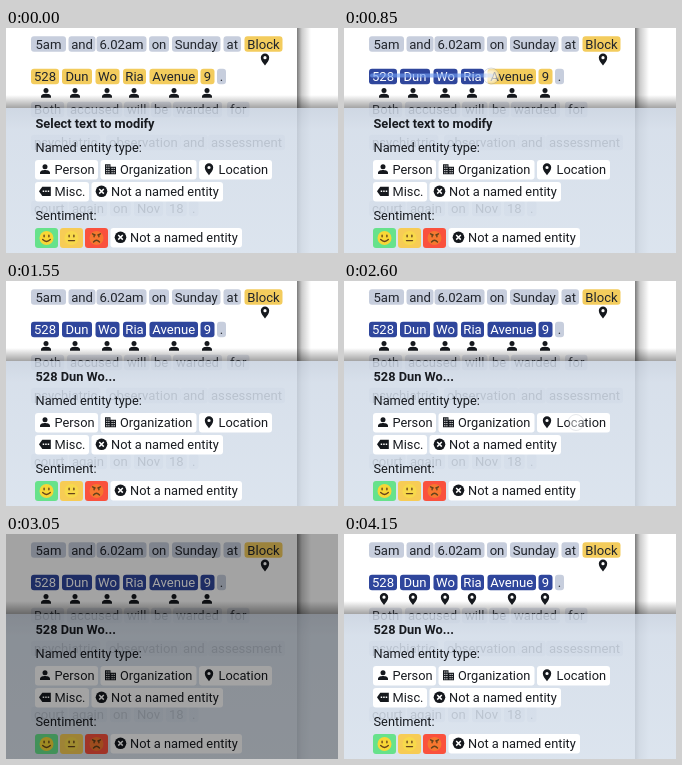
These frames come from a looping animation (332 px wide and 225 px high, 4.5 s). An HTML page:

```html
<!DOCTYPE html>
<html lang="en">
<head>
<meta charset="utf-8">
<title>Entity tagging</title>
<style>
  html, body { margin: 0; width: 100%; height: 100%; overflow: hidden; background: #fff; }
  svg { display: block; width: 332px; height: 225px; }
  text { font: 13.1px Roboto, sans-serif; fill: #20242b; }
  .panel text { font-size: 12.8px; fill: #181b20; }
  .panel .title { font-weight: 700; }
  .word rect { fill: #c7cedd; }
  .entity rect { fill: #f3cc5d; }
  .picked rect { fill: #2f469c; }
  .picked text { fill: #fff; }
  .behind rect { opacity: .5; }
  .behind text { fill: #41454d; }
</style>
</head>
<body>
<svg viewBox="0 0 332 225">
  <defs>
    <linearGradient id="edge">
      <stop offset="0" stop-color="#000" stop-opacity=".52"/>
      <stop offset=".35" stop-color="#000" stop-opacity=".2"/>
      <stop offset="1" stop-color="#000" stop-opacity="0"/>
    </linearGradient>
    <linearGradient id="lift" x2="0" y2="1">
      <stop offset="0" stop-color="#000" stop-opacity="0"/>
      <stop offset="1" stop-color="#000" stop-opacity=".36"/>
    </linearGradient>
    <linearGradient id="sheet" x2="0" y2="1">
      <stop offset="0" stop-color="#c6d0de"/>
      <stop offset=".15" stop-color="#d0dae7"/>
      <stop offset="1" stop-color="#d5dfeb"/>
    </linearGradient>
    <radialGradient id="glow">
      <stop offset=".55" stop-color="#fff" stop-opacity=".92"/>
      <stop offset="1" stop-color="#fff" stop-opacity=".35"/>
    </radialGradient>
    <g id="person">
      <circle cy="-2.6" r="2.5"/>
      <path d="M-5 4.8V3.5C-5 1.4-2 .7 0 .7S5 1.4 5 3.5V4.8Z"/>
    </g>
    <path id="pin" fill-rule="evenodd" d="M0 6C-2 3.4-4.2.8-4.2-1.8A4.2 4.2 0 0 1 4.2-1.8C4.2.8 2 3.4 0 6ZM0-3.4A1.6 1.6 0 1 0 0-.2A1.6 1.6 0 1 0 0-3.4Z"/>
    <g id="building">
      <path d="M-5.5-5H0V-2.6H5.5V5H-5.5Z"/>
      <path d="M-4.3-3.3H-1M-4.3-1H-1M-4.3 1.3H-1M-4.3 3.5H-1M1-.9H4.3M1 1.3H4.3M1 3.5H4.3" stroke="#fff" stroke-dasharray="1.2 .9"/>
    </g>
    <g id="label">
      <path d="M-6 0L-2.7-4.6H5.8V4.6H-2.7Z"/>
      <path d="M-2.3 0H4.4" stroke="#fff" stroke-width="1.5" stroke-dasharray="1.5 1"/>
    </g>
    <g id="cancel">
      <circle r="5.8"/>
      <path d="M-2.3-2.3L2.3 2.3M2.3-2.3L-2.3 2.3" stroke="#fff" stroke-width="1.5"/>
    </g>
  </defs>

  <rect width="332" height="225" fill="#fff"/>
  <rect x="291" width="14" height="225" fill="url(#edge)"/>
  <g id="page"></g>
  <path id="trail" fill="none" stroke="#6f9cf0" stroke-width="4" stroke-linecap="round"/>
  <rect y="67" width="332" height="13" fill="url(#lift)"/>
  <rect y="80" width="332" height="145" fill="url(#sheet)" opacity=".84"/>
  <g class="panel" id="panel">
    <text class="title" id="title" x="29.5" y="100"></text>
    <text x="29.5" y="124">Named entity type:</text>
    <text x="29.5" y="192">Sentiment:</text>
  </g>
  <rect id="dim" width="332" height="225"/>
  <circle id="touch" r="8" fill="url(#glow)" stroke="#8b93a3" stroke-opacity=".55" stroke-width=".8"/>
</svg>
<script>
const LOOP = 4500, STEP = 50;
const $ = id => document.getElementById(id);

function add(parent, tag, attrs, content) {
  const node = document.createElementNS('http://www.w3.org/2000/svg', tag);
  for (const key in attrs) node.setAttribute(key, attrs[key]);
  if (content) node.textContent = content;
  return parent.appendChild(node);
}

function icon(parent, name, x, y) {
  return add(parent, 'use', { href: '#' + name, x, y, fill: '#15181d' });
}

function word(label, left, right, baseline, kind = '') {
  const group = add($('page'), 'g', { class: 'word ' + kind });
  add(group, 'rect', { x: left, y: baseline - 12.3, width: right - left, height: 15.5, rx: 3 });
  add(group, 'text', { x: (left + right) / 2, y: baseline, 'text-anchor': 'middle' }, label);
  return { group, left };
}

word('5am', 25, 60, 20.5);
word('and', 62.5, 89.5, 20.5);
word('6.02am', 90.5, 140.5, 20.5);
word('on', 143, 163, 20.5);
word('Sunday', 166, 214.5, 20.5);
word('at', 217.5, 235, 20.5);
word('Block', 238.5, 276.5, 20.5, 'entity');
icon($('page'), 'pin', 259, 31.5);

const address = [
  ['528', 25, 53, 40], ['Dun', 56, 86, 69], ['Wo', 89.5, 113.5, 101],
  ['Ria', 117, 140, 128], ['Avenue', 143.5, 192, 168], ['9', 194.5, 208.5, 201]
].map(([label, left, right, iconX]) => ({
  ...word(label, left, right, 53, 'entity'),
  mark: icon($('page'), 'person', iconX, 65)
}));
word('.', 211, 220, 53);

// Text rows covered by the translucent panel: label and left edge
function coveredRow(baseline, words) {
  for (const [label, left] of words) {
    const group = add($('page'), 'g', { class: 'word behind' });
    const text = add(group, 'text', { x: left, y: baseline }, label);
    const box = add(group, 'rect', {
      x: left - 3, y: baseline - 12.3, width: text.getComputedTextLength() + 6, height: 15.5, rx: 3
    });
    group.insertBefore(box, text);
  }
}
coveredRow(86, [['Both', 28], ['accused', 64], ['will', 121], ['be', 148], ['warded', 170], ['for', 224]]);
coveredRow(119, [['psychiatric', 28], ['observation', 103], ['and', 177], ['assessment', 205]]);
coveredRow(185, [['court', 28], ['again', 66], ['on', 107], ['Nov', 131], ['18', 163], ['.', 186]]);

function button(label, left, right, top, iconName) {
  add($('panel'), 'rect', { x: left, y: top, width: right - left, height: 19.5, rx: 3, fill: '#fff' });
  icon($('panel'), iconName, left + 10, top + 9.3);
  add($('panel'), 'text', { x: left + 19.5, y: top + 14.3 }, label);
}
button('Person', 29, 92, 132, 'person');
button('Organization', 94.5, 190.5, 132, 'building');
button('Location', 193, 266, 132, 'pin');
button('Misc.', 29, 83, 154, 'label');
button('Not a named entity', 85.5, 217, 154, 'cancel');
button('Not a named entity', 104.5, 236, 200, 'cancel');

function face(left, back, skin, mouth) {
  add($('panel'), 'rect', { x: left, y: 200, width: 23, height: 20, rx: 3, fill: back });
  const head = add($('panel'), 'g', { transform: `translate(${left + 11.5} 210)` });
  add(head, 'circle', { r: 7, fill: skin });
  add(head, 'path', {
    d: 'M-2.4-2.8V-1.2M2.4-2.8V-1.2' + mouth, fill: 'none', stroke: '#65431b',
    'stroke-width': 1.4, 'stroke-linecap': 'round'
  });
}
face(29, '#67e28b', '#f8d736', 'M-3.8 1.6Q0 5.2 3.8 1.6');
face(54, '#f7cc55', '#f8d94b', 'M-3 2.6H3');
face(79, '#fa513d', '#f7772f', 'M-3 4Q0 .5 3 4M-4-4.2L-1.4-3M4-4.2L1.4-3');

const ramp = (t, from, to) => Math.min(1, Math.max(0, (t - from) / (to - from)));
const pulse = (t, on, full, fade, off) => ramp(t, on, full) * (1 - ramp(t, fade, off));

function render(t) {
  const swipe = 1 - (1 - ramp(t, 600, 1175)) ** 2;
  const x = 28 + 175 * swipe;
  const tapping = t >= 2000;

  for (const { group, left, mark } of address) {
    group.classList.toggle('picked', t >= 600 && x >= left + 4);
    mark.setAttribute('href', t >= 4150 ? '#pin' : '#person');
  }
  $('trail').setAttribute('d', `M28 47.5H${x}`);
  $('trail').setAttribute('opacity', .65 * pulse(t, 550, 600, 1200, 1450));
  $('title').textContent = t >= 1350 ? '528 Dun Wo...' : 'Select text to modify';

  $('touch').setAttribute('cx', tapping ? 232 : x);
  $('touch').setAttribute('cy', tapping ? 141.5 : 48);
  $('touch').setAttribute('opacity', tapping
    ? pulse(t, 2550, 2650, 2850, 3050)
    : .75 * pulse(t, 500, 600, 1200, 1400));

  const shade = t >= 3850 ? 0 : .36 * ramp(t, 2600, 2750) - .03 * ramp(t, 3450, 3550);
  $('dim').setAttribute('opacity', shade);
}

const start = performance.now();
function tick() {
  const t = (performance.now() - start) % LOOP;
  render(Math.floor(t / STEP) * STEP);
  requestAnimationFrame(tick);
}
tick();
</script>
</body>
</html>
```
